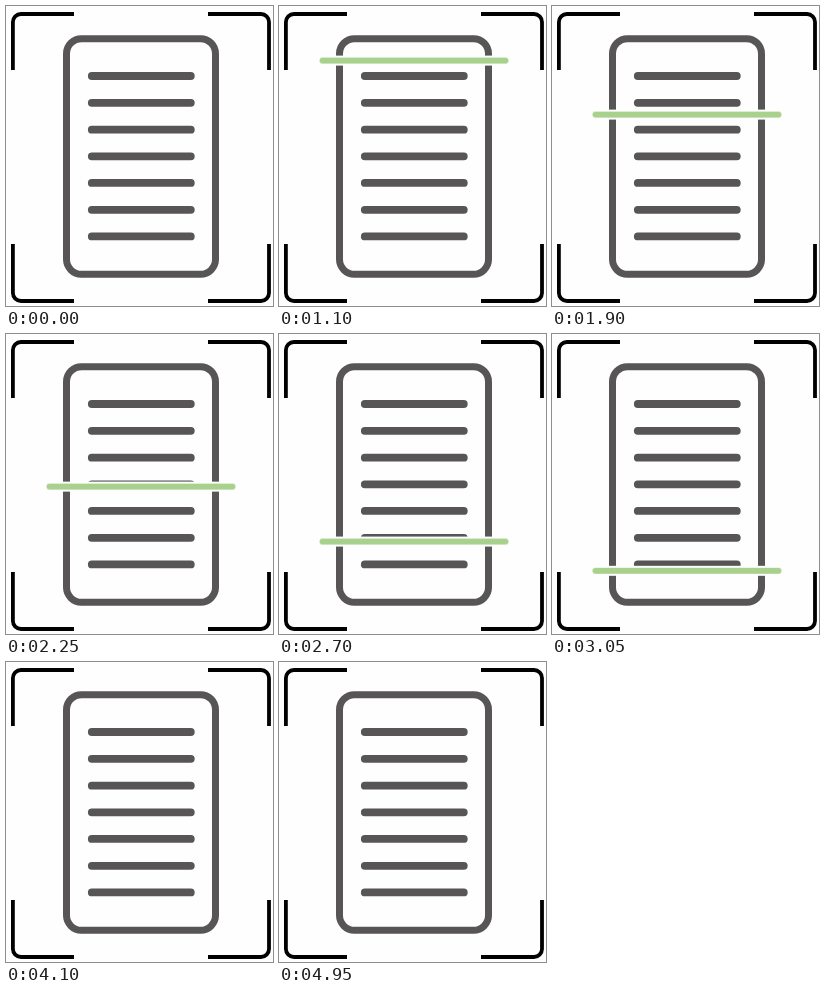
Animation, 267 px wide and 300 px high, one loop 5 s. Source, as an HTML page without scripts:

```html
<!DOCTYPE html>
<html lang="en">
<head>
<meta charset="utf-8">
<title>Document scan</title>
<style>
  html, body { margin: 0; width: 100%; height: 100%; overflow: hidden; background: #fefefe; }
  svg { display: block; width: 100%; height: 100%; }
  .corners { fill: none; stroke: #000; stroke-width: 3.8; }
  .page { fill: none; stroke: #575556; stroke-width: 7; }
  .lines { stroke: #575556; stroke-width: 7.8; stroke-linecap: round; }
  .scan { opacity: 0; animation: sweep 5s infinite, fade 5s linear infinite; }
  .gap { fill: #fefefe; }
  .bar { fill: #a9d18e; }

  @keyframes sweep {
    0%, 19% { transform: translateY(53.3px); animation-timing-function: ease-in-out; }
    71%, 100% { transform: translateY(251.7px); }
  }
  @keyframes fade {
    0%, 12% { opacity: 0; }
    19%, 71% { opacity: 1; }
    78%, 100% { opacity: 0; }
  }
</style>
</head>
<body>
<svg viewBox="0 0 267 300">
  <g class="corners">
    <path d="M6.9 64V16a8 8 0 0 1 8-8H68"/>
    <path d="M202 8h53a8 8 0 0 1 8 8V64"/>
    <path d="M6.9 238v49a8 8 0 0 0 8 8H68"/>
    <path d="M202 295h53a8 8 0 0 0 8-8V238"/>
  </g>
  <rect class="page" x="60.5" y="32.7" width="149" height="235.6" rx="15"/>
  <path class="lines" d="M85.8 70h99M85.8 96.8h99M85.8 123.7h99M85.8 150.3h99M85.8 176.9h99M85.8 203.8h99M85.8 230.4h99"/>
  <g class="scan">
    <rect class="gap" x="40" y="-5" width="190" height="10"/>
    <rect class="bar" x="40.5" y="-3" width="189" height="6" rx="3"/>
  </g>
</svg>
</body>
</html>
```
